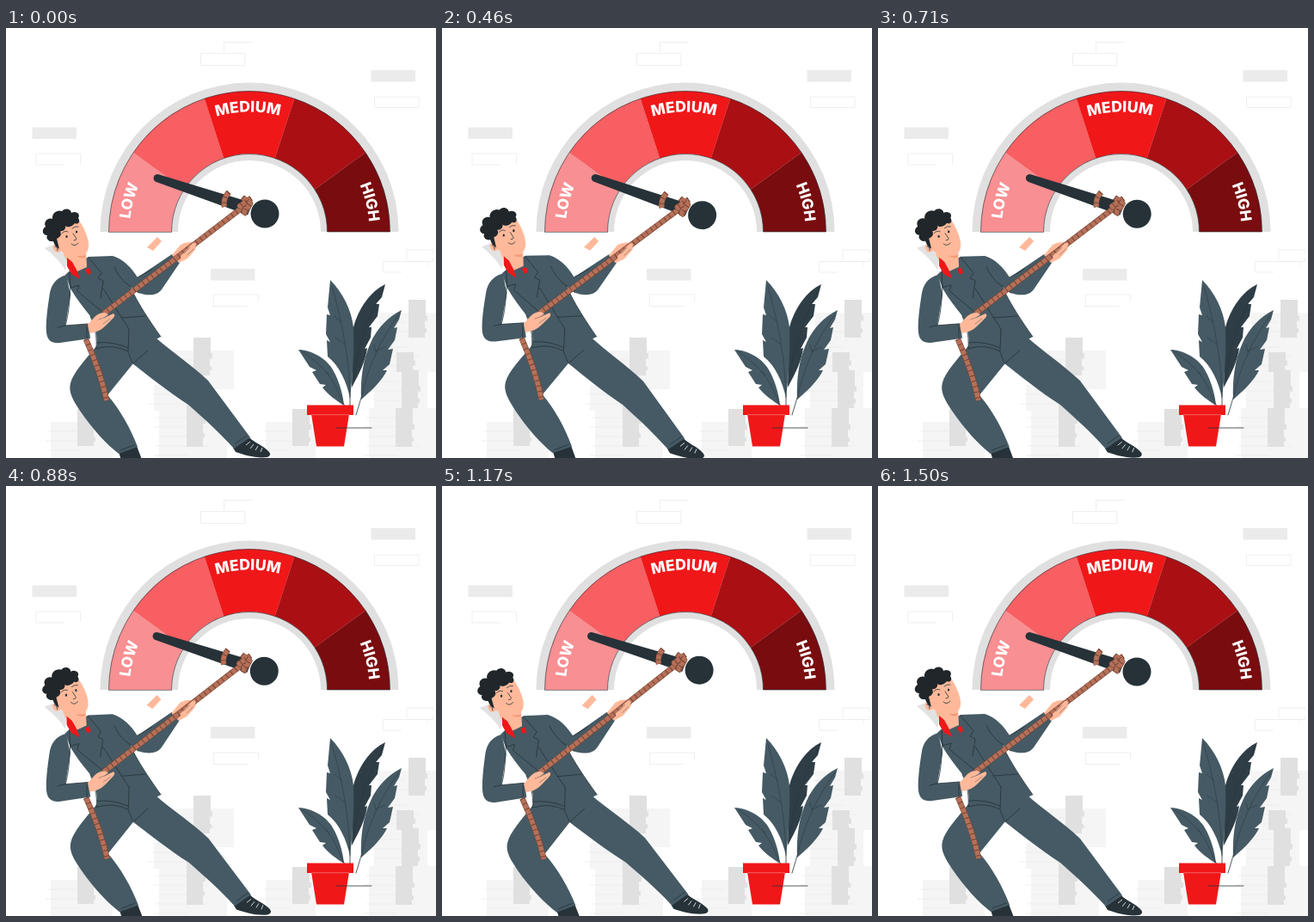
An HTML page that plays this animation: 500 by 500 pixels, repeating every 1.54 s.

```html
<!DOCTYPE html>
<html lang="en">
<head>
<meta charset="utf-8">
<title>Gauge pull</title>
<style>
html, body { margin: 0; width: 100%; height: 100%; overflow: hidden; background: #fff; }
svg { display: block; width: 100vw; height: 100vh; }
.label { font: 800 17.6px Inter, "Open Sans", sans-serif; fill: #fff; text-anchor: middle; }
.suit { fill: #455a64; }
.ink { fill: #263238; }
.line { fill: none; stroke: #263238; stroke-width: .8; stroke-linecap: round; stroke-linejoin: round; }
.skin { fill: #ffb99a; }
.red { fill: #f01719; }
.frame { fill: none; stroke: #ebebeb; stroke-width: .8; }
.block { fill: #ebebeb; }
.pile { fill: #f5f5f5; }
.spine { fill: #e0e0e0; }
.edge { fill: none; stroke: #ebebeb; stroke-width: .8; }
.rope { fill: none; stroke-linejoin: round; }
</style>
</head>
<body>
<svg viewBox="0 0 500 500">
  <g id="wall">
    <path class="frame" d="M226.5 29.5H278V43.5H226.5ZM253.5 28V16.5H286M428.5 92.5V80H480V92.5H428.5M35 159V146H86.5V158M35 159H68M241.5 323.5V310H293.5V318M241.5 323.5H281M438.5 284V271.5H490V276M438.5 284H460M466 270V258H497V262M466 271.5H497V267"/>
    <path class="block" d="M424.5 49H476V62.5H424.5ZM30.5 115.5H82V129H30.5ZM238 280H289.5V293.5H238Z"/>
  </g>
  <g id="piles"></g>
  <g id="gauge">
    <path id="arc" fill="none" d="M143.5 237A139.5 139.5 0 0 1 422.5 237"/>
  </g>

  <g id="plant">
    <path class="line" d="M400 425V440M413 430L407 450M390 432L394 440"/>
    <path fill="#2f3e46" d="M441 298C424 306 410 326 404 348L402 418C411 401 418 388 420 372L417 373L424 360L425 348L422 348L432 335L434 321L430 321L437 313Z"/>
    <path class="suit" d="M377 293C391 307 402 328 404 348C405 374 403 407 400 430C396 411 387 392 374 382L373 363L377 365L372 356L373 333L377 334L374 325Z"/>
    <path class="suit" d="M460 328C444 336 431 350 424 366C415 386 412 407 413 432C427 420 437 410 443 398L438 398L446 391L450 373L444 374L452 363L455 348L451 349L457 339Z"/>
    <path class="suit" d="M340 374C358 375 376 386 383 403C389 416 392 428 393 439C384 433 375 427 368 418L372 415L365 414L356 400L361 398L353 394Z"/>
    <path class="line" stroke-opacity=".6" d="M379 300C390 340 399 380 400 430M390 342L382 335M394 368L383 360M439 302C422 335 408 370 403 415M417 345L412 338M457 333C437 360 422 390 413 430M430 376L428 368M430 376L441 371M344 376C370 393 383 411 392 437M376 404L372 399"/>
    <path class="red" d="M355 449H399L393 486.5H361Z"/>
    <path class="red" d="M350 438.5H404V450H350Z"/>
    <path d="M355 449.7H399" stroke="#f77475" stroke-width=".8"/>
    <path class="line" d="M384 465H425"/>
  </g>

  <g id="actor">
    <path class="ink" d="M177.5 170.2L287 203.500L281 217.500L174.7 178.9A4.5 4.5 0 0 1 177.5 170.2Z"/>
    <circle class="ink" cx="301" cy="216" r="16.5"/>

    <g id="shoes" class="ink">
      <path d="M131 493L152 486L160 507L150 512H137Z"/>
      <path d="M264 488L283 476C288 482 299 485 306 493Q309 497 304 499C291 501 276 496 267 493Z"/>
    </g>
    <path d="M279 485L284 481M284 489L288 484M290 491L293 486M296 493L298 488" stroke="#fff" stroke-width=".8" fill="none"/>

    <path class="suit" d="M138 370L174 360C192 376 216 392 235 410L284 476L265 489C248 470 231 455 212 438C190 424 165 404 147 390Z"/>
    <path class="suit" d="M105 370C92 386 78 401 75 413C72 424 79 434 86 445C101 467 117 484 131 495L153 487C145 466 133 444 118 427L148 390L160 366Z"/>
    <path class="line" d="M147 389L142 377M148 390L165 375M267 483L280 474M133 491L149 485"/>

    <path d="M45 256L58 251L72 267L69 282Q63 270 45 256Z" fill="#e2e2e2"/>
    <path class="suit" d="M70 287C57 291 53 299 51 308C48 327 46 344 47 354C48 364 54 367 63 366L98 361L96 344L69 346L75 310Z"/>
    <path class="suit" d="M69 287L84 273L96 266L124 265C137 269 146 279 153 290L193 263L202 273L181 304C176 311 166 312 154 308L144 300C153 320 168 342 180 359L156 372L142 376C129 371 117 370 105 373C107 357 104 347 98 335C90 325 82 315 75 303Z"/>
    <path class="line" d="M75 299C74 317 73 333 69 346L95 344M69 346L60 348M126 278C130 287 136 295 144 300L154 308M153 290C160 286 165 284 170 280M144 300C153 320 168 342 180 359M98 335C103 349 106 356 105 373Q124 367 142 376L143 350M143 350L127 325L113 303M134 337L162 335M106 366Q124 364 142 372M177 288L195 267M94 346V360"/>
    <path class="line" d="M74 284L75 302L85 299L83 306L113 331M96 267L111 285L107 291L113 294L110 314"/>

    <path class="skin" d="M63 250L69 268L83 283L94 278L93 258Z"/>
    <path fill="#f39a78" d="M78 261Q84 267 93 264L92 267Q84 269 78 261Z"/>
    <path class="skin" d="M58 246L66 230L84 223C90 230 95 242 96 250C97 260 92 265 84 265C76 265 69 263 64 259Q58 264 55 257Q53 252 58 252Z"/>
    <path style="fill:#20262a" d="M62 257C58 255 56 251 55 248C49 249 46 244 48 241C42 241 41 234 46 231C43 225 49 220 54 222C53 215 60 211 65 213C69 208 76 211 76 215C82 212 87 217 84 221C87 225 84 229 80 227C76 232 71 232 69 230C70 234 66 237 63 236C65 241 63 243 59 245Z"/>
    <path d="M57 254Q60 254 60 259" class="line"/>
    <ellipse class="ink" cx="70.5" cy="242.5" rx="1.2" ry="1.6"/>
    <ellipse class="ink" cx="82" cy="237" rx="1.2" ry="1.6"/>
    <path class="line" d="M65 239Q68 235 72 237M77 233Q80 230 84 231M78 239L82 245Q82 247 79 247M76 251Q80 255 84 250"/>
    <path class="red" d="M71 267L77 272L82 281L86 292L76 286L71 277ZM92 281L97 279L99 285L95 287Z"/>

    <path class="skin" d="M164 255L176 243L181 248L171 259Z"/>
    <path class="rope" data-rope d="M93 362C101 380 111 404 117 433"/>
    <path class="skin" d="M193 264L203 252Q208 249 214 249L220 250Q223 254 219 259L211 268L201 273Z"/>
    <path class="rope" data-rope d="M113 332.500L277 207"/>
    <path class="skin" d="M203 265L209 259L215 252Q219 248 221 251Q221 256 215 262L204 271Z"/>
    <path class="line" stroke-opacity=".5" d="M207 262L214 255M211 264L218 257"/>
    <path class="skin" d="M95 345L103 336Q108 331 115 331L119 333L114 337L125 332Q128 334 124 338L115 347Q108 354 97 355Z"/>
    <path class="line" stroke-opacity=".5" d="M108 339L116 336M113 344L121 338"/>
    <path class="rope" data-rope d="M259 191Q252 199 254 208"/>
    <path class="rope" data-rope d="M275 197L284 204L276 217M285 198L272 207L281 213"/>
  </g>
</svg>
<script>
const NS = "http://www.w3.org/2000/svg";
const $ = id => document.getElementById(id);
const add = (parent, tag, attrs, text) => {
  const el = document.createElementNS(NS, tag);
  for (const k in attrs) el.setAttribute(k, attrs[k]);
  if (text) el.textContent = text;
  parent.appendChild(el);
  return el;
};

// Gauge: angles run from the left end, over the top, to the right end.
// The dividers fan out from a point DROP below the arc's centre.
const CX = 283, CY = 237, DROP = 6, RAD = Math.PI / 180, gauge = $("gauge");
const point = (r, deg) => {
  const fan = deg * RAD;
  const a = deg % 180 ? fan - Math.asin(DROP * Math.cos(fan) / r) : fan;
  return (CX - r * Math.cos(a)).toFixed(2) + " " + (CY - r * Math.sin(a)).toFixed(2);
};
const band = (outer, inner, from, to) =>
  `M${point(outer, from)}A${outer} ${outer} 0 0 1 ${point(outer, to)}` +
  `L${point(inner, to)}A${inner} ${inner} 0 0 0 ${point(inner, from)}Z`;

add(gauge, "path", { d: band(173.5, 83, 0, 180), fill: "#e0e0e0" });
["#f88f92", "#f75f62", "#f01719", "#aa1013", "#790c0f"].forEach((fill, i) =>
  add(gauge, "path", { d: band(163.5, 90.5, i * 36, i * 36 + 36), fill }));
add(gauge, "path", { d: band(163.5, 90.5, 0, 180), class: "line", style: "stroke-width:.6" });
[["LOW", 14.6], ["MEDIUM", 89.3], ["HIGH", 166.1]].forEach(([word, deg]) => {
  const text = add(gauge, "text", { class: "label" });
  add(text, "textPath", { href: "#arc", startOffset: deg / 1.8 + "%" }, word);
});

// Paper piles: pale sheets with a darker ragged spine.
const piles = $("piles");
const pile = (x, y, w, h) => {
  add(piles, "rect", { class: "pile", x, y, width: w, height: h });
  let d = "";
  for (let k = 1; k * 11 < h; k++)
    d += `M${x - (k % 3) * 3} ${y + k * 11}h${w * (k % 2 ? .5 : .8)}`;
  add(piles, "path", { class: "edge", d });
};
const spine = (x, y, h) => add(piles, "path", {
  class: "spine",
  d: `M${x} ${y}h20v${h * .42}h2v6h-3v${h * .2}h2v5h-2V${y + h}h-19Z`
});
[[52, 458, 72, 42], [179, 375, 86, 45], [172, 415, 64, 30], [178, 442, 79, 58],
 [302, 458, 58, 42], [434, 331, 66, 29], [440, 360, 60, 40], [428, 400, 62, 42],
 [422, 442, 78, 58]].forEach(p => pile(...p));
[[83, 443, 43], [218, 360, 44], [210, 430, 57], [333, 443, 43], [468, 316, 44],
 [454, 377, 23], [460, 398, 44], [453, 442, 45]].forEach(s => spine(...s));

// Each rope is an outline, a brown core and evenly spaced twists.
document.querySelectorAll("[data-rope]").forEach(el => {
  [["#74432f", 6.6], ["#b5705a", 5.6], ["#74432f", 5.8, "1 5.5"]].forEach(([stroke, width, dash]) => {
    const strand = el.cloneNode();
    strand.setAttribute("stroke", stroke);
    strand.setAttribute("stroke-width", width);
    if (dash) strand.setAttribute("stroke-dasharray", dash);
    el.before(strand);
  });
  el.remove();
});

// Linear sway: 0, +1, 0, -1, 0 degrees.
const LOOP = 1540, SWAY = 1500, actor = $("actor");
const swing = p => p < .25 ? p * 4 : p < .75 ? 2 - p * 4 : p * 4 - 4;
function draw(now) {
  const p = (now % LOOP) % SWAY / SWAY;
  actor.setAttribute("transform", `rotate(${swing(p).toFixed(4)} 181 337)`);
  requestAnimationFrame(draw);
}
draw(performance.now());
</script>
</body>
</html>
```
